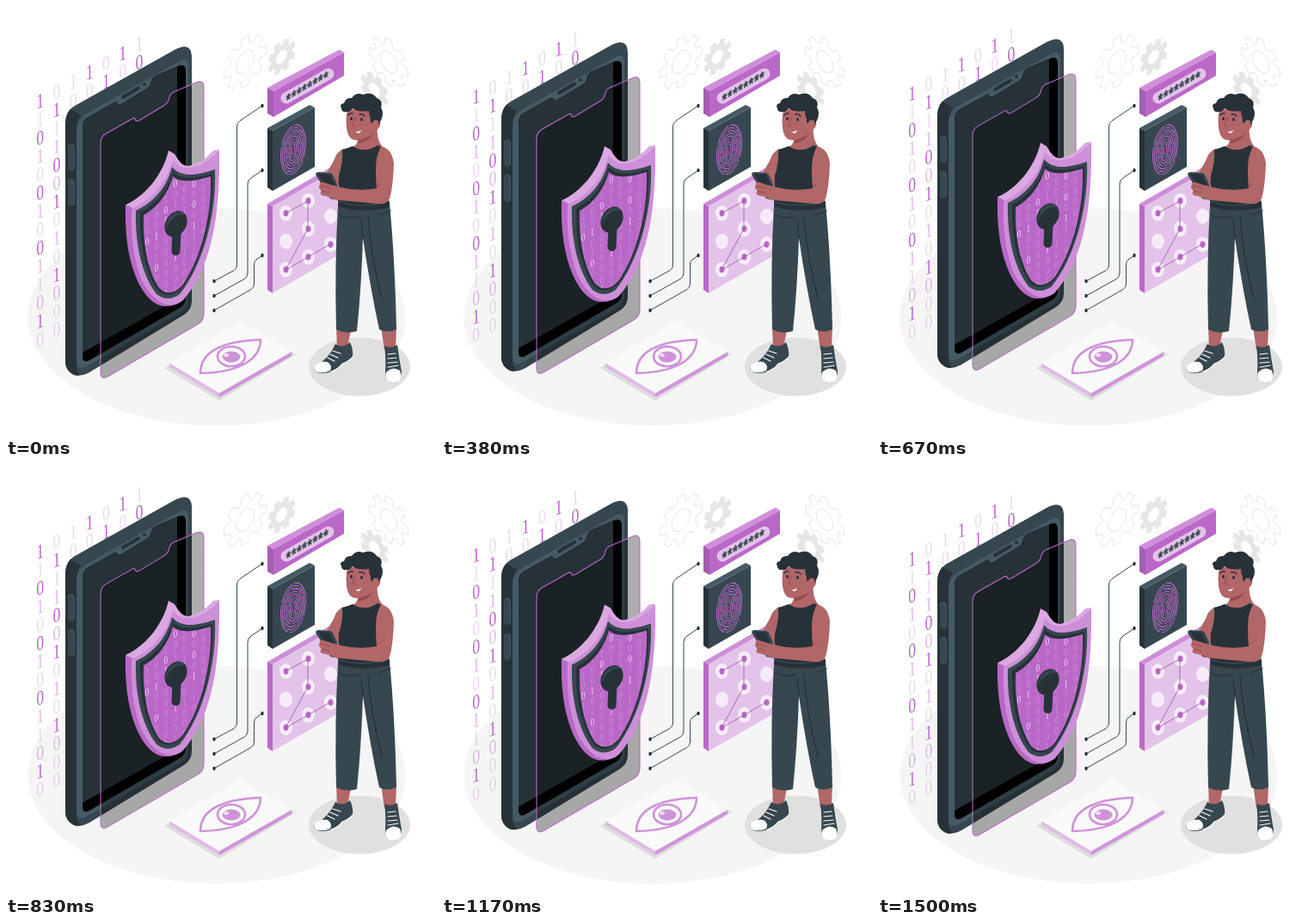
Write an HTML page that moves like this. It is 500 by 500 pixels and loops after 1.54 s.

```html
<!DOCTYPE html>
<html lang="en">
<head>
<meta charset="utf-8">
<title>Mobile security</title>
<style>
  html, body { margin: 0; width: 100%; height: 100%; overflow: hidden; background: #fff; }
  svg { display: block; width: 100%; height: 100%; }
  text { font-family: "Liberation Serif", serif; text-anchor: middle; }
  .stars text { font: bold 19px "Liberation Sans", sans-serif; }
  .line { fill: none; stroke-linecap: round; stroke-linejoin: round; }
</style>
</head>
<body>
<svg viewBox="0 0 500 500" xmlns="http://www.w3.org/2000/svg">
  <defs>
    <path id="glass" d="M110 160Q110 152 116 148.500L147 131Q150 129.500 150 131.500Q151 135 155 133L184 115.500Q189 112.500 190 106Q191 102 195 100L221 89Q230 85 230 95V358Q230 366 223 370L118 431Q110 435 110 426Z"/>
    <clipPath id="screenClip"><use href="#glass" x="-21" y="-19"/></clipPath>
    <path id="crest" d="M160 243C176 235 189 217 194 198C204 207 222 203 238 198C240 243 226 296 205 325Q191 340 178 328C164 306 159 275 160 243Z"/>
    <clipPath id="crestClip"><use href="#crest"/></clipPath>
  </defs>

  <ellipse cx="245" cy="361.500" rx="219.500" ry="126.500" fill="#f5f5f5"/>
  <g id="gears"></g>

  <!-- password bar -->
  <path fill="#d08fda" d="M304 95L386 51.500Q388 50.500 390 52L393 54L311 99Z"/>
  <path fill="#a75eb4" d="M304 95L311 99V129L304 125Z"/>
  <path fill="#ba68c8" d="M311 99L393 54V81L311 129Z"/>
  <path class="line" stroke="#e3c3e9" stroke-width="13" d="M326 107L375 79"/>
  <g id="stars" class="stars" fill="#37474f" stroke="#37474f" stroke-width=".4"></g>

  <!-- fingerprint tile -->
  <path fill="#455a64" d="M304 142L353 115L359 118L310 145Z"/>
  <path fill="#263238" d="M304 142L310 145V215L304 211Z"/>
  <path fill="#37474f" d="M310 145L359 118V187L310 215Z"/>
  <g id="print" class="line" stroke="#ba68c8" stroke-width="1.100"></g>

  <!-- unlock pattern tile -->
  <path fill="#cd8fd8" d="M304 230L387 182L393 185L310 233Z"/>
  <path fill="#ba68c8" d="M304 230L310 233V334L304 330Z"/>
  <path fill="#e3c3e9" d="M310 233L393 185V286L310 334Z"/>
  <g id="pattern"></g>
  <path class="line" stroke="#a75eb4" stroke-width=".9" d="M325 241L351 227V259L325 307L377 277"/>

  <g class="line" stroke="#37474f">
    <path d="M242 320L265 307.500Q268.500 305.500 268.500 301V140Q268.500 136 272 133.500L298 116"/>
    <path d="M242 337L277 317.500Q281 315 281 311V207Q281 202.500 285 200L298 191"/>
    <path d="M242 354L285 329.500Q288.500 327.500 288.500 323V301Q288.500 297 291 295L298 290"/>
  </g>
  <g id="ends" fill="#263238"></g>

  <!-- eye card -->
  <path fill="#dedede" d="M184 421L272 370L337 405L248 459Z"/>
  <path fill="#e0bbe6" d="M190 415L248 450V455L190 420Z"/>
  <path fill="#cf95d9" d="M248 450L332 402V407L248 455Z"/>
  <path fill="#fafafa" d="M190 415L272 367L332 402L248 450Z"/>
  <g class="line" stroke="#ce93d8" stroke-width="2.600">
    <path d="M226 427C226 406 244 390 296 388C296 407 278 426 226 427Z"/>
    <ellipse cx="262" cy="407.500" rx="16" ry="11.500"/>
  </g>
  <ellipse cx="262" cy="408" rx="10.500" ry="6.500" fill="#ce93d8"/>
  <ellipse cx="256" cy="406" rx="3" ry="2" fill="#f0dcf3"/>

  <!-- person -->
  <ellipse cx="411" cy="419.500" rx="59" ry="34" fill="#e0e0e0"/>
  <path fill="#b16668" d="M384 372H402L397 397L385 399ZM436 372H454L453 399L440 400Z"/>
  <path fill="#37474f" d="M383 393Q391 399 400 391Q404 399 403 408Q397 414 390 417Q380 427 367 427Q357 426 358 420Q376 410 383 393Z"/>
  <path fill="#fff" d="M359 418Q366 412 374 414Q380 418 377 424Q368 428 360 425Q357 422 359 418Z"/>
  <path class="line" stroke="#fff" stroke-width="1.200" d="M374 409L382 413M377 405L386 409M380 401L389 404M378 425Q386 423 391 416Q399 413 403 408"/>
  <path fill="#37474f" d="M440 395Q448 399 455 394Q457 410 460 425Q459 438 450 438Q441 437 441 427Q442 410 440 395Z"/>
  <path fill="#fff" d="M442 426Q450 418 458 424Q461 431 457 436Q450 440 444 436Q440 431 442 426Z"/>
  <path class="line" stroke="#fff" stroke-width="1.200" d="M444 405L453 404M444 410L454 409M444 415L455 414M444 420L456 418"/>
  <path fill="#37474f" d="M386 232Q415 240 446 230Q452 290 454 376Q443 381 434 376Q424 330 415 270Q413 330 408 378Q395 382 384 376Q382 300 386 232Z"/>
  <path class="line" stroke="#263238" stroke-width="1.300" d="M415 270L413 250M387 243Q399 248 410 245M421 246Q424 290 437 340M447 238L434 243"/>
  <path fill="#b16668" d="M392 166Q384 170 381 180L373 194L378 207L390 209L395 190Z"/>
  <path fill="#b16668" d="M409 146L432 138Q430 155 438 164Q428 175 414 172Q404 170 402 164Q411 162 409 146Z"/>
  <path fill="#9a4a4d" d="M410 154Q421 154 427 148Q423 157 410 160Z"/>
  <path fill="#263238" d="M391 167Q398 165 403 163Q417 172 432 162L438 164Q428 185 437 211L446 228V234Q415 242 386 233L387 197Q392 182 391 167Z"/>
  <path class="line" stroke="#455a64" stroke-width=".8" d="M387 228Q416 236 445 227"/>
  <path fill="#37474f" d="M360 196Q360 193 364 193L376 194Q379 194 381 198L391 222Q391 226 387 226L377 224Z"/>
  <path fill="#263238" d="M363 195L377 196L388 223L378 222Z"/>
  <path fill="#b16668" d="M436 163Q449 166 451 183Q450 211 446 224Q443 231 433 230L389 226Q381 225 376 222L367 220Q364 217 367 215Q362 211 365 208Q364 204 369 205L378 208L390 211Q410 216 431 212Q429 189 431 177Q433 169 436 163Z"/>
  <path class="line" stroke="#9a4a4d" stroke-width=".9" d="M431 210L436 207M367 215L376 217M366 209L377 212"/>
  <path fill="#b16668" d="M397 121Q394 134 397 147Q400 157 409 156Q420 154 427 146Q437 143 435 133L428 116Z"/>
  <path fill="#263238" d="M397 123Q390 124 390 119Q387 114 393 113Q395 106 402 107Q407 100 415 103Q426 99 431 107Q439 110 436 118Q440 125 436 133L433 138Q430 132 428 137Q423 138 424 132Q422 127 422 122Q410 124 403 119Q400 123 397 123Z"/>
  <path fill="#b16668" d="M425 137Q429 130 433 134Q434 142 427 145Z"/>
  <path fill="#263238" d="M400 131a1.500 2 0 1 0 3 0a1.500 2 0 1 0-3 0ZM412 132a1.500 2 0 1 0 3 0a1.500 2 0 1 0-3 0Z"/>
  <path class="line" stroke="#263238" stroke-width="1.400" d="M398 127Q400 124 403 125M411 126Q415 125 417 128"/>
  <path class="line" stroke="#9a4a4d" stroke-width="1.100" d="M406 130L403 139L406 140"/>
  <path fill="#fff" d="M406 146Q410 147 413 144Q412 148 409 148Z"/>

  <g id="float">
    <g id="rain" fill="#ba68c8" font-size="24"></g>

    <!-- phone -->
    <path fill="#37474f" d="M69 137Q69 122 80 116L196 51Q215 41 216 58V343Q216 353 207 359L97 426Q86 432 78 428Q69 423 69 413Z"/>
    <path fill="#263238" d="M69 137Q69 126 75 120L87 127Q82 133 82 143V416Q82 426 87 429Q81 431 77 428Q69 423 69 413Z"/>
    <path fill="#455a64" d="M82 147Q82 132 94 125L202 64Q212 59 212 71V342Q212 351 204 356L94 419Q82 425 82 413Z"/>
    <use href="#glass" x="-21" y="-19"/>
    <path clip-path="url(#screenClip)" fill="#263238" d="M80 40H199V341L80 408Z"/>
    <path class="line" stroke="#263238" stroke-width="4" d="M136 106L154 95.500M161 91V91"/>
    <path class="line" stroke="#37474f" stroke-width="8" d="M76 164V188M76 205V229"/>
    <path class="line" stroke="#455a64" d="M72.500 164Q73 160 77 161Q79.500 163 79.500 168V188M72.500 205Q73 201 77 202Q79.500 204 79.500 209V229"/>

    <use href="#glass" fill="#000" fill-opacity=".32" stroke="#ba68c8" stroke-width="1.100"/>

    <!-- shield: sides, rim, dark band, crest -->
    <path fill="#ba68c8" d="M139 231L148 236L189 250L206 342Q197 350 183 349Q169 347 158 329C142 302 138 265 139 231Z"/>
    <path fill="#dba8e2" d="M139 231C160 222 182 198 189 168L196 172Q204 187 212 186Q228 183 241 168L248 167L240 230L148 236Z"/>
    <path fill="#cd8fd8" d="M146 236C168 226 187 207 194 178C205 196 228 189 248 168C249 230 243 300 206 342Q193 352 179 344Q165 335 157 317C147 290 145 262 146 236Z"/>
    <path fill="#37474f" d="M151 238C172 228 187 211 193 187C204 200 222 197 243 190C245 240 230 300 202 335Q188 345 175 335C157 311 150 275 151 238Z"/>
    <path fill="#263238" d="M156 240C174 231 189 213 194 193C205 203 221 200 240 195C242 242 228 298 204 329Q189 341 177 331C161 308 155 275 156 240Z"/>
    <use href="#crest" fill="#ba68c8"/>
    <g id="code" clip-path="url(#crestClip)" fill="#fff" font-size="12.500"></g>
    <g id="key" fill="#263238">
      <ellipse rx="12" ry="16" transform="translate(197.500 253.500) rotate(30)"/>
      <path class="line" stroke="#263238" stroke-width="10" d="M198.500 262L197.500 285"/>
      <path fill="#37474f" d="M186 262Q185 247 196 241Q205 237 209 243Q200 241 193 248Q187 254 186 262Z"/>
    </g>
  </g>
</svg>
<script>
const put = (id, markup) => { document.getElementById(id).innerHTML = markup; };
const glyph = (ch, x, y, opacity = 1, skew = -.25) =>
  `<text transform="matrix(.74 ${skew} 0 1 ${x} ${y})" opacity="${opacity}">${ch}</text>`;
const dot = (x, y, rx, ry, fill) =>
  `<ellipse cx="${x}" cy="${y}" rx="${rx}" ry="${ry}" ${fill ? `fill="${fill}"` : ''}/>`;

function gear(x, y, r, skew, solid) {
  const points = [];
  for (let i = 0; i < 8; i++) {
    for (const [offset, k] of [[-.27, .74], [-.17, 1], [.17, 1], [.27, .74]]) {
      const a = (i + (solid ? .5 : 0)) * Math.PI / 4 + offset;
      points.push((Math.cos(a) * r * k).toFixed(2) + ' ' + (Math.sin(a) * r * k).toFixed(2));
    }
  }
  const h = r * .43;
  const hole = `M${h} 0A${h} ${h} 0 1 0 ${-h} 0A${h} ${h} 0 1 0 ${h} 0Z`;
  return `<path d="M${points.join('L')}Z${hole}" fill-rule="evenodd" stroke-linejoin="round"
    fill="${solid ? '#e6e6e6' : '#fff'}" stroke="#e6e6e6" transform="matrix(.866 ${skew} 0 1 ${x} ${y})"/>`;
}
put('gears', gear(278, 65, 28.5, -.5) + gear(320.5, 59, 18.5, -.5, true) +
  gear(445, 65, 26.5, .5) + gear(428.5, 97.5, 18.5, .5, true));

let stars = '';
for (let i = 0; i < 8; i++) stars += glyph('*', 328.5 + i * 6.2, 115 - i * 3.65, 1, -.4);
put('stars', stars);

let print = '';
for (let i = 1; i <= 8; i++) {
  print += `<ellipse rx="${i * 2.1}" ry="${3 + i * 3.1}" transform="matrix(.866 -.45 0 1 334 167)"
    stroke-dasharray="${14 + i * 3} 2.500 ${6 + i * 2} 3" stroke-dashoffset="${i * 11}"/>`;
}
put('print', print);

let pattern = '';
for (let row = 0; row < 3; row++) {
  for (let col = 0; col < 3; col++) {
    const x = 325.5 + col * 26, y = 241 + row * 32.7 - col * 14.6;
    const picked = !(row === 1 && col !== 1) && !(row === 0 && col === 2);
    pattern += dot(x, y, 7.5, 9, '#f6ecf8');
    if (picked) pattern += dot(x, y, 3, 3.7, '#ba68c8');
  }
}
put('pattern', pattern);

put('ends', [[242, 320], [242, 337], [242, 354], [298, 116], [298, 191], [298, 290]]
  .map(([x, y]) => dot(x, y, 1.7, 2.3)).join(''));

// Each column: digits from top to bottom, then their strength.
const columns = [
  ['11010010011010', '20210210210120'],
  ['01110010101000', '02012120102100'],
  ['10', '00'], ['10', '20'], ['01', '02'], ['10', '20'], ['10', '02']
];
put('rain', columns.map(([digits, strength], c) => [...digits].map((ch, r) =>
  glyph(ch, 39.7 + c * 19.2, 118.3 - c * 11.1 + r * 21.3, [.25, .45, 1][strength[r]])).join('')).join(''));

let code = '';
for (let c = 0; c < 7; c++) {
  for (let r = 0; r < 14; r++) {
    const seed = (c * 37 + r * 53 + c * r * 11) % 17;
    code += glyph(seed % 3 ? 0 : 1, 164 + c * 10.9, 217 - c * 6.2 + r * 12.2, seed % 5 ? .25 : .75);
  }
}
put('code', code);

// Linear rise and fall of 10 units at 24 steps a second, with a short rest before the loop restarts.
const LOOP = 1540, FLOAT = 1500, LIFT = 10, STEP = 1000 / 24;
const floating = document.getElementById('float');
const start = performance.now();
function draw() {
  const elapsed = (performance.now() - start) % LOOP;
  const t = Math.min(Math.floor((elapsed + 5) / STEP) * STEP, FLOAT);
  const y = LIFT * (Math.abs(2 * t / FLOAT - 1) - 1);
  floating.setAttribute('transform', `translate(0 ${y.toFixed(3)})`);
  requestAnimationFrame(draw);
}
draw();
</script>
</body>
</html>
```
